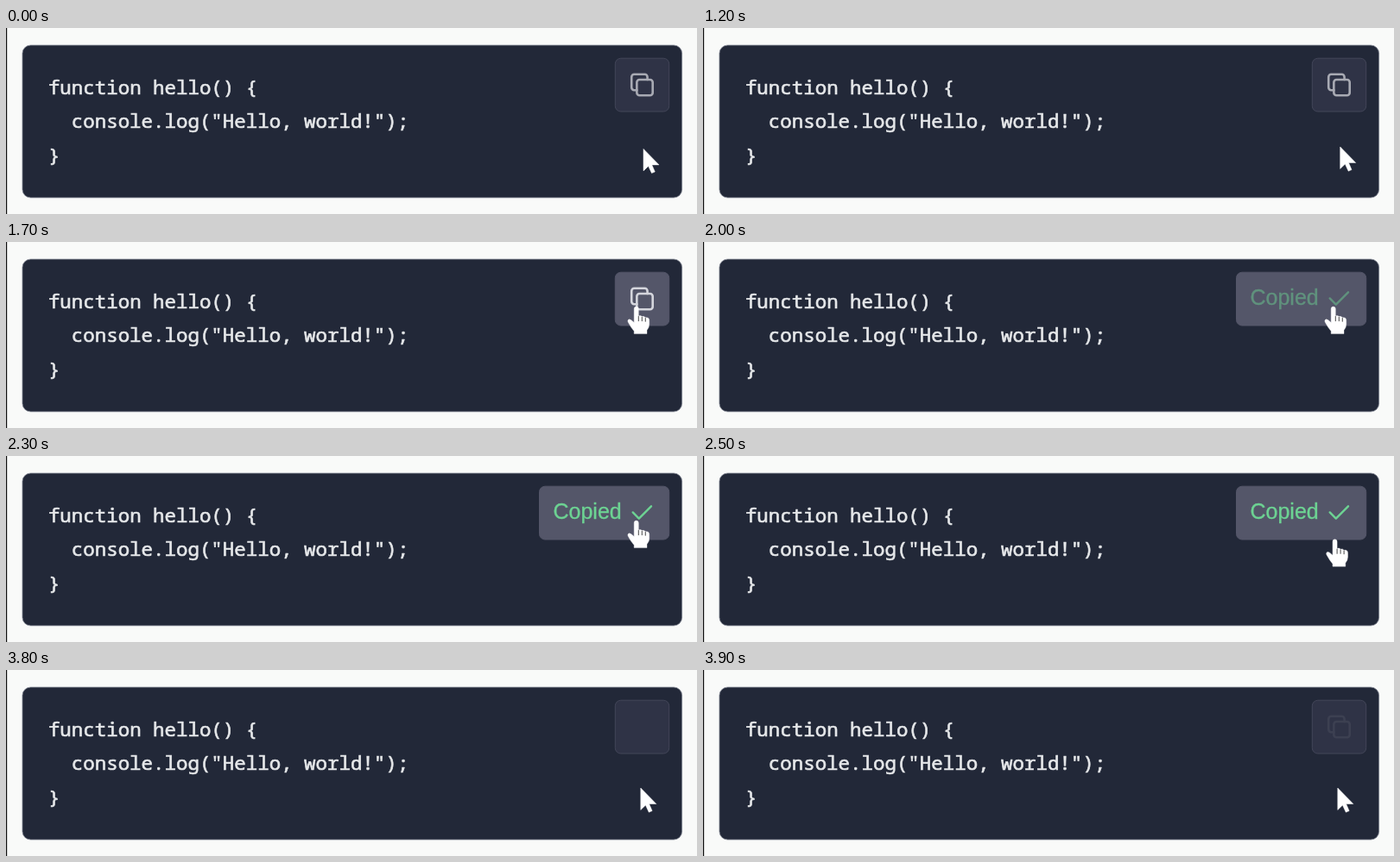
An HTML page for the animation above (4000 ms loop, 800 by 216 pixels).

```html
<!DOCTYPE html>
<html lang="en">
<head>
<meta charset="utf-8">
<title>Copy button</title>
<style>
  html, body { margin: 0; width: 100%; height: 100%; overflow: hidden; background: #f9faf9; }
  svg { display: block; width: 100vw; height: 100vh; }
  .code {
    font: 22.45px "Noto Sans Mono", monospace; font-variant-ligatures: none;
    fill: #e6e8ea; stroke: #e6e8ea; stroke-width: .65;
  }
  .label { font: 25px "Liberation Sans", Arial, sans-serif; stroke-width: .35; }
  .line { fill: none; stroke-width: 1.7; stroke-linecap: round; stroke-linejoin: round; }
</style>
</head>
<body>
<svg viewBox="0 0 800 216">
  <rect width="800" height="216" fill="#f9faf9"/>
  <rect width="1.2" height="216" fill="#111"/>
  <rect x="19" y="20" width="763.6" height="177" rx="9.5" fill="#222838" stroke="#7d828e" stroke-width=".8"/>
  <g class="code">
    <text x="48.9" y="76.5">function hello() {</text>
    <text x="75.8" y="115.5">console.log("Hello, world!");</text>
    <text x="48.9" y="156">}</text>
  </g>
  <rect id="button" y="35.2" height="61.8" rx="6.5"/>
  <g id="copy" class="line" transform="translate(718.1 47.7) scale(1.53)">
    <rect x="8" y="8" width="12" height="12" rx="2"/>
    <path d="M16 8V6a2 2 0 0 0-2-2H6a2 2 0 0 0-2 2v8a2 2 0 0 0 2 2h2"/>
  </g>
  <g id="done">
    <text class="label" x="633.5" y="73">Copied</text>
    <path class="line" transform="translate(718.6 48.4) scale(1.42)" d="M5 12l5 5L20 7"/>
  </g>
  <path id="arrow" fill="#fff" stroke="#fff" stroke-width=".5" stroke-linejoin="round"
    d="M0 0V25.5L5.7 20L9.5 28.2L13.3 26.6L9.8 18.5H18Z"/>
  <g id="hand">
    <path fill="#fff" stroke="#fff" stroke-width=".4" stroke-linejoin="round"
      d="M-2.5 2.2Q-2.5-.5 0-.5T2.6 2.2V10.3Q4.8 9 6.6 11Q9 10 10.6 12.2Q15 11.6 15 15.5V20Q15 24 12.3 27V31H-2.5V28Q-6 24-9.5 17.5Q-10.5 15-8.5 14.2Q-6.5 13.8-2.5 18Z"/>
    <path fill="none" stroke="#333" stroke-width=".9" d="M2.6 10.5V16.5M6.6 11.3V16.5M10.6 12.5V17"/>
  </g>
</svg>
<script>
const LOOP = 4000, STEP = 100;
const CLICK = 1800, RESET = 3800;
const REST = [738, 140.4], TARGET = [729.7, 75.6], AWAY = [734.8, 137];
const el = id => document.getElementById(id);
const [button, copy, done, arrow, hand] = ["button", "copy", "done", "arrow", "hand"].map(el);

const ramp = (t, start, length) => Math.min(1, Math.max(0, (t - start) / length));
const smooth = u => u * u * (3 - 2 * u);
const mix = (a, b, p) => a.map((v, i) => v + (b[i] - v) * p);
const rgb = (a, b, p) => `rgb(${mix(a, b, p).map(Math.round)})`;
const show = (node, on) => node.setAttribute("visibility", on ? "visible" : "hidden");

function pointer(t) {
  return t < CLICK
    ? mix(REST, TARGET, smooth(ramp(t, 1135, 565)))
    : mix(TARGET, AWAY, smooth(ramp(t, 2300, 500)));
}

function draw(t) {
  const copied = t >= CLICK && t < RESET;
  const hover = ramp(t, 1430, 150) - ramp(t, 2530, 150);

  const x = copied ? 617.5 : 705.3;
  button.setAttribute("x", x);
  button.setAttribute("width", 767.7 - x);
  button.setAttribute("fill", rgb([47, 51, 70], [84, 86, 105], hover));
  button.setAttribute("stroke", rgb([67, 70, 89], [84, 86, 105], hover));

  show(copy, !copied);
  copy.setAttribute("stroke", rgb([168, 170, 179], [212, 213, 220], hover));
  copy.setAttribute("opacity", t < RESET ? 1 : smooth(ramp(t, 3810, 450)));

  const green = rgb([93, 178, 131], [109, 211, 147], hover);
  show(done, copied);
  done.setAttribute("fill", green);
  done.setAttribute("stroke", green);
  done.setAttribute("opacity", smooth(ramp(t, 1780, 450)));

  const [px, py] = pointer(t);
  const over = py <= 97.5;
  for (const node of [arrow, hand]) node.setAttribute("transform", `translate(${px} ${py})`);
  show(hand, over);
  show(arrow, !over);
}

const origin = performance.now();
function tick() {
  const t = (performance.now() - origin) % LOOP;
  draw(Math.floor(t / STEP) * STEP);
  requestAnimationFrame(tick);
}
tick();
</script>
</body>
</html>
```
